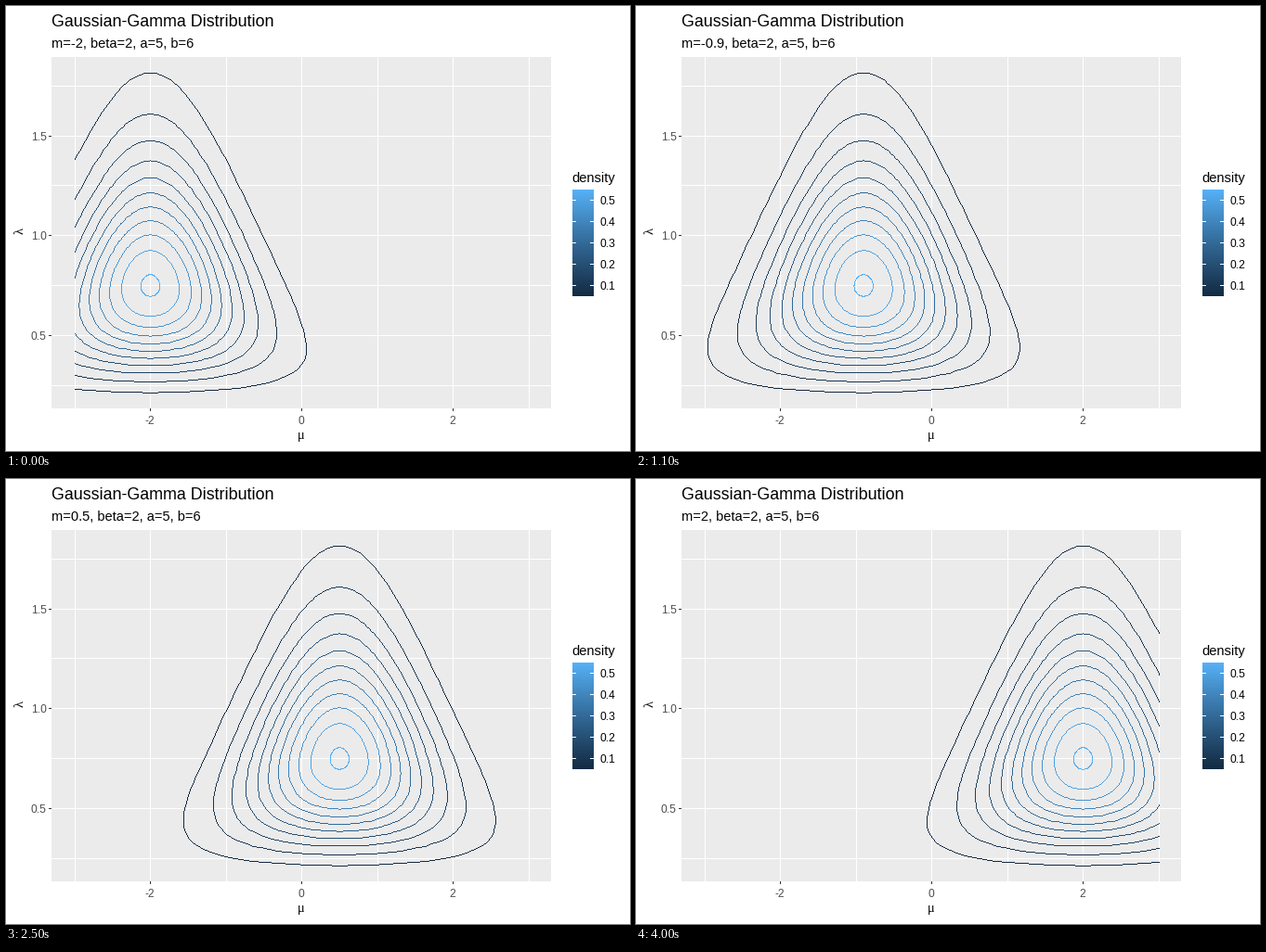
Animation of 672x480 px, one loop 4.1 s. Source, as a matplotlib script:

```python
import math

import matplotlib.pyplot as plt
import numpy as np
from matplotlib.animation import FuncAnimation
from matplotlib.patches import Rectangle

W, H, DPI = 672, 480, 96
FRAMES, INTERVAL = 41, 100
BETA, A, B = 2, 5, 6
LEVELS = np.arange(1, 12) * 0.05

PANEL = (49, 55, 538, 379)  # left, top, width, height
BAR = (610, 198, 23, 115)


def to_x(mu):
    return 318.5 + 81.5 * mu


def to_y(lam):
    return 247.85 - 215.6 * (lam - 1)


# Colour gradient blended in CIELAB
RGB_XYZ = np.array([[0.4124564, 0.3575761, 0.1804375],
                    [0.2126729, 0.7151522, 0.0721750],
                    [0.0193339, 0.1191920, 0.9503041]])
WHITE = RGB_XYZ.sum(axis=1)
XYZ_LAB = np.array([[0, 116, 0], [500, -500, 0], [0, 200, -200]])


def to_lab(hex_code):
    rgb = np.array([int(hex_code[i:i + 2], 16) for i in (1, 3, 5)]) / 255
    linear = np.where(rgb > 0.04045, ((rgb + 0.055) / 1.055) ** 2.4, rgb / 12.92)
    t = RGB_XYZ @ linear / WHITE
    return XYZ_LAB @ np.where(t > 0.008856, np.cbrt(t), 7.787 * t + 16 / 116) - [16, 0, 0]


def to_rgb(lab):
    fy = (lab[0] + 16) / 116
    f = np.array([fy + lab[1] / 500, fy, fy - lab[2] / 200])
    t = np.where(f > 0.206893, f ** 3, (f - 16 / 116) / 7.787)
    linear = np.clip(np.linalg.inv(RGB_XYZ) @ (t * WHITE), 0, 1)
    return np.where(linear > 0.0031308, 1.055 * linear ** (1 / 2.4) - 0.055, 12.92 * linear)


LOW, HIGH = to_lab("#132B43"), to_lab("#56B1F7")


def shade(t):
    return np.clip(to_rgb(LOW + (HIGH - LOW) * t), 0, 1)


# Contours of the density, solved for mu as a function of lambda
def log_ridge(lam):
    """Log density along mu = m."""
    return (0.5 * np.log(BETA * lam / (2 * math.pi)) + A * math.log(B)
            - math.lgamma(A) + (A - 1) * np.log(lam) - B * lam)


def bisect(level, inside, outside):
    for _ in range(60):
        mid = (inside + outside) / 2
        if log_ridge(mid) > math.log(level):
            inside = mid
        else:
            outside = mid
    return inside


def contour(level):
    """Closed curve as (mu - m, lambda)."""
    mode = (A - 0.5) / B
    lo, hi = bisect(level, mode, 0.01), bisect(level, mode, 4.0)
    angle = np.linspace(0, math.pi, 80)
    lam = (lo + hi) / 2 - (hi - lo) / 2 * np.cos(angle)
    gap = np.maximum(log_ridge(lam) - math.log(level), 0)
    half = np.sqrt(2 * gap / (BETA * lam))
    half[[0, -1]] = 0
    return np.r_[half, -half[::-1]], np.r_[lam, lam[::-1]]


def trace(x, y):
    """Pixels of a one-pixel polyline without smoothing."""
    x, y = np.floor(x), np.floor(y)
    steps = np.maximum(abs(np.diff(x)), abs(np.diff(y)))
    keep = np.r_[True, steps > 0]
    at = np.r_[0, np.cumsum(steps)][keep]
    walk = np.arange(at[-1] + 1)
    cols, rows = (np.floor(np.interp(walk, at, v[keep]) + 0.5).astype(int)
                  for v in (x, y))
    # The density is only evaluated for mu between -3 and 3
    shown = (cols >= to_x(-3)) & (cols <= to_x(3))
    return rows[shown], cols[shown]


fig = plt.figure(figsize=(W / DPI, H / DPI), dpi=DPI, facecolor="white")
ax = fig.add_axes([0, 0, 1, 1])
ax.axis("off")


def box(x, y, w, h, color, z=1):
    ax.add_patch(Rectangle((x, y), w, h, facecolor=color, linewidth=0,
                           antialiased=False, zorder=z))


def label(x, y, text, px, color="black", font="Liberation Sans", **kw):
    return ax.text(x, y, text, fontsize=px * 72 / DPI, color=color,
                   family=font, va="baseline", zorder=5, **kw)


def picture(pixels, x, y, w, h, z):
    return ax.imshow(pixels, extent=(x, x + w, y + h, y), aspect="auto",
                     interpolation="nearest", zorder=z)


# Panel, grid and axes
left, top, width, height = PANEL
box(*PANEL, "#EBEBEB")
for mu in range(-3, 4):
    x = math.floor(to_x(mu))
    box(x, top, 1, height, "white", 2)
    if mu % 2 == 0:
        box(x, top + height, 1, 3, "#333333")
        label(x - 0.5, 451, str(mu), 12, "#4D4D4D", ha="center")
for k in range(1, 8):
    y = math.floor(to_y(k / 4))
    box(left, y, width, 1, "white", 2)
    if k in (2, 4, 6):
        box(left - 3, y, 3, 1, "#333333")
        label(43.5, y + 5, f"{k / 4:.1f}", 12, "#4D4D4D", ha="right")

label(318, 467, "μ", 14.67, font="Liberation Serif", ha="center")
label(19, 243, "λ", 14.67, font="Liberation Serif", ha="center",
      rotation=90, rotation_mode="anchor")
label(49, 22, "Gaussian-Gamma Distribution", 17.9)
subtitle = label(49, 45, "", 14.67)

# Colour bar
bx, by, bw, bh = BAR
ramp = np.array([[shade(t)] for t in np.linspace(1, 0, bh)])
picture(ramp, *BAR, 2)
label(609, 190, "density", 14.67)
for k in range(1, 6):
    y = round(by + bh * (0.55 - k / 10) / 0.5 - 0.5)
    box(bx, y, 4, 1, "white", 3)
    box(bx + bw - 4, y, 4, 1, "white", 3)
    label(640, y + 5, f"{k / 10:.1f}", 12)

curves = [(shade((level - 0.05) / 0.5), *contour(level)) for level in LEVELS]
layer = picture(np.zeros((H, W, 4)), 0, 0, W, H, 4)

ax.set_xlim(0, W)
ax.set_ylim(H, 0)


def draw(frame):
    m = (frame - 20) / 10
    subtitle.set_text(f"m={m:g}, beta={BETA}, a={A}, b={B}")
    pixels = np.zeros((H, W, 4))
    for color, offset, lam in curves:
        pixels[trace(to_x(m + offset), to_y(lam))] = [*color, 1]
    layer.set_data(pixels)
    return subtitle, layer


anim = FuncAnimation(fig, draw, frames=FRAMES, interval=INTERVAL,
                     repeat=True, repeat_delay=0, blit=False)
plt.show()
```
